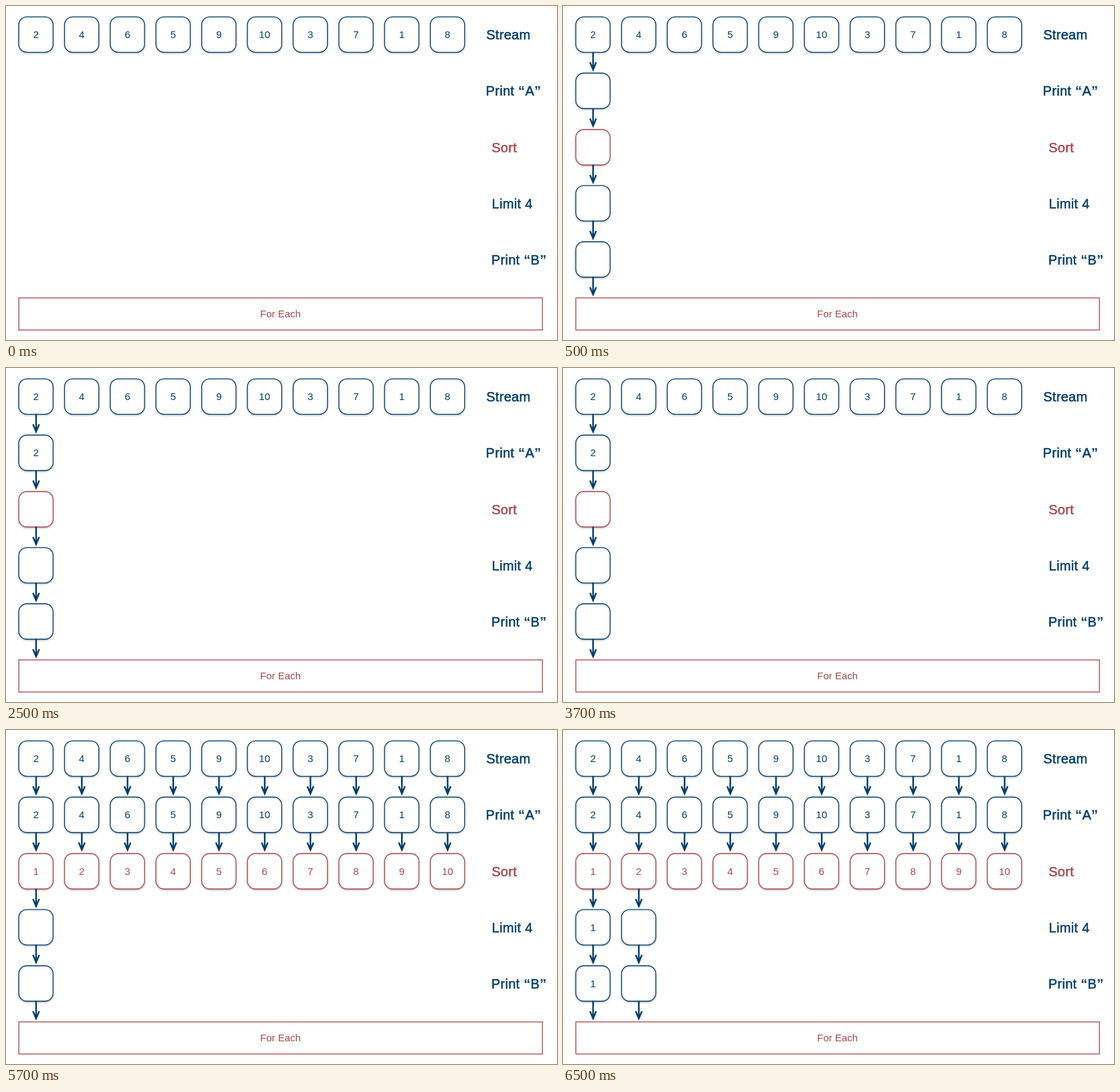
Animation of 824x500 px, one loop 8 s. Source, as an HTML page:

```html
<!DOCTYPE html>
<html lang="en">
<head>
<meta charset="utf-8">
<title>Stream pipeline</title>
<style>
  html, body { margin: 0; width: 100%; height: 100%; overflow: hidden; background: #fff; }
  svg { display: block; font: 15px "Liberation Sans", Arial, sans-serif; }
  .navy { --ink: #003c6b; }
  .red { --ink: #a8474d; }
  rect { fill: #fff; stroke: var(--ink); stroke-width: 1.3; }
  .box { filter: drop-shadow(0 1.5px 1.5px rgba(0, 0, 0, .3)); }
  text { fill: var(--ink); text-anchor: middle; }
  .label { font-size: 20px; letter-spacing: .3px; text-anchor: start; stroke: var(--ink); stroke-width: .5; }
  .quote { font-weight: bold; stroke: none; }
  .arrow { fill: none; stroke: var(--ink); stroke-width: 2.4; stroke-miterlimit: 10; }
</style>
</head>
<body>
<svg width="824" height="500" viewBox="0 0 824 500"><g id="scene"></g></svg>
<script>
const LOOP = 8000;
const LEFT = 19.2, PITCH = 68.38, WIDTH = 51.2, HEIGHT = 53;
const input = [2, 4, 6, 5, 9, 10, 3, 7, 1, 8];
const sorted = [...input].sort((a, b) => a - b);
const quote = s => `<tspan class="quote">“</tspan>${s}<tspan class="quote">”</tspan>`;

const rows = [
  { y: 16.3, x: 718.2, label: "Stream", values: input },
  { y: 100.5, x: 717.6, label: "Print " + quote("A"), values: input },
  { y: 185, x: 726.2, label: "Sort", values: sorted, red: true },
  { y: 268.8, x: 726.6, label: "Limit 4", values: sorted },
  { y: 353, x: 725.8, label: "Print " + quote("B"), values: sorted }
];

// Per row: number of boxes, and number of boxes already filled in
const stages = [
  { at: 0, boxes: [10, 0, 0, 0, 0], filled: [10, 0, 0, 0, 0] },
  { at: 500, boxes: [10, 1, 1, 1, 1], filled: [10, 0, 0, 0, 0] },
  { at: 2500, boxes: [10, 1, 1, 1, 1], filled: [10, 1, 0, 0, 0] },
  { at: 4500, boxes: [10, 10, 10, 1, 1], filled: [10, 10, 10, 0, 0] },
  { at: 6500, boxes: [10, 10, 10, 2, 2], filled: [10, 10, 10, 1, 1] }
];

const times = (n, draw) => Array.from({ length: n }, (_, i) => draw(i)).join("");
const colX = i => LEFT + i * PITCH;
const midX = i => colX(i) + WIDTH / 2;

function drawRow(row, r, { boxes, filled }) {
  const box = i => `<rect class="box" x="${colX(i)}" y="${row.y}" width="${WIDTH}" height="${HEIGHT}" rx="12"/>`;
  const digit = i => `<text x="${midX(i)}" y="${row.y + 31.8}">${row.values[i]}</text>`;
  return `<g class="${row.red ? "red" : "navy"}">
    <text class="label" x="${row.x}" y="${row.y + 33.8}">${row.label}</text>
    ${times(boxes[r], box)}${times(filled[r], digit)}</g>`;
}

function drawArrows(row, r, { boxes }) {
  const count = boxes[Math.min(r + 1, rows.length - 1)];
  return times(count, i => `<path class="arrow navy"
    d="M${midX(i) + .2} ${row.y + 52.5}v26.5m-4.6 -11l4.6 11l4.6 -11"/>`);
}

function drawScene(stage) {
  const each = draw => rows.map((row, r) => draw(row, r, stage)).join("");
  return `<g class="red"><rect x="19.2" y="437" width="783" height="48"/>
    <text x="410.5" y="466">For Each</text></g>` + each(drawRow) + each(drawArrows);
}

const scene = document.getElementById("scene");
let start, shown;
function tick(now) {
  start ??= now;
  const t = (now - start) % LOOP;
  const stage = stages.findLast(s => s.at <= t);
  if (stage !== shown) scene.innerHTML = drawScene(shown = stage);
  requestAnimationFrame(tick);
}
requestAnimationFrame(tick);
</script>
</body>
</html>
```
